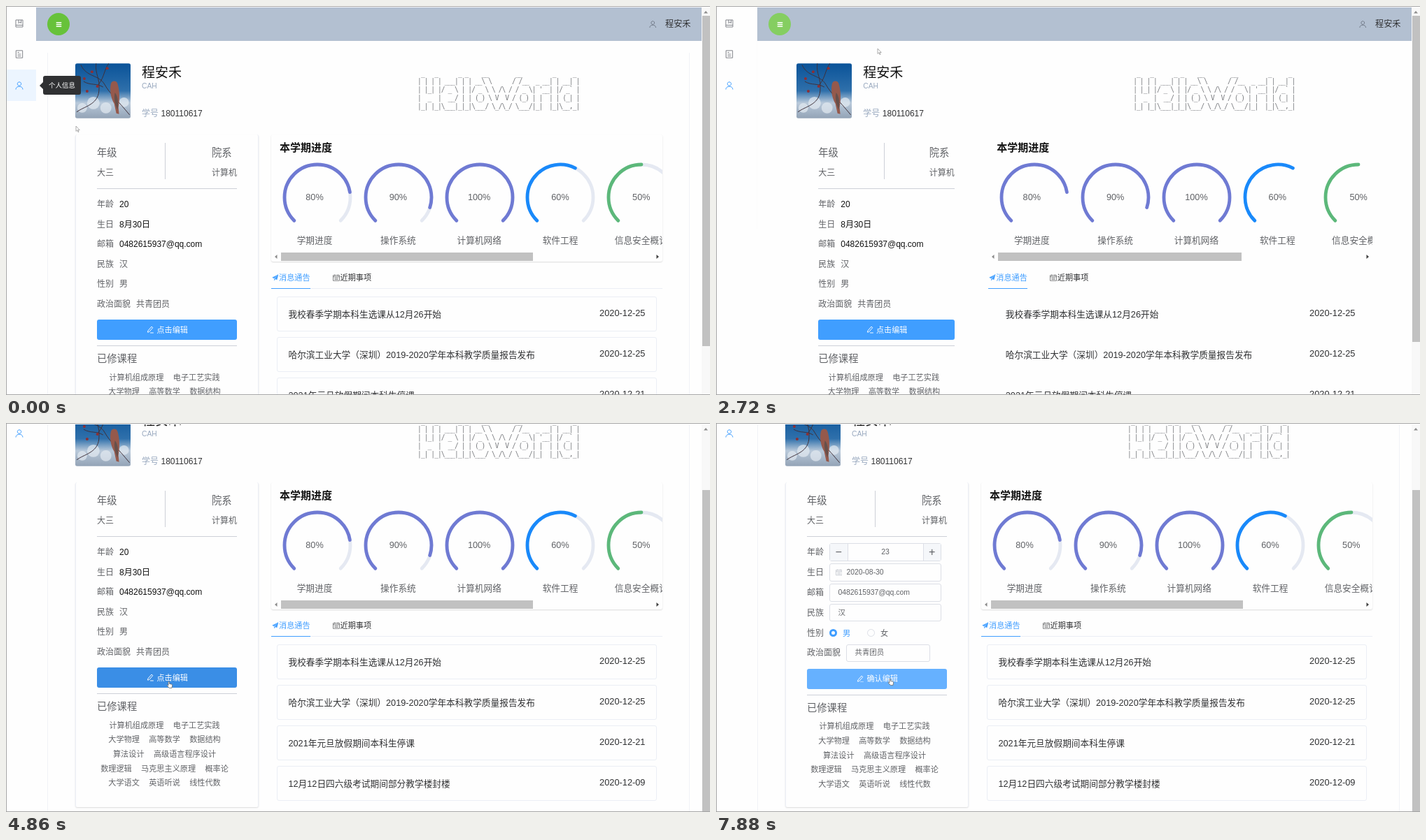
An HTML page that plays this animation: 1006x557 px, repeating every 8000 ms.

```html
<!DOCTYPE html>
<html lang="zh-CN">
<head>
<meta charset="utf-8">
<title>个人信息</title>
<style>
html, body { margin: 0; width: 100%; height: 100%; overflow: hidden; background: #fff; }
#stage { --k: 0; --edge: #ebeef5; --track: #e5e9f2; --shade: rgba(0,0,0,.14); --btn: #409eff;
  position: absolute; inset: 0; width: 1006px; height: 557px; overflow: hidden; background: #fefefe;
  font-family: "Liberation Sans", "Noto Sans CJK SC", "Noto Sans CJK", sans-serif; color: #303133; }
#stage.pale { --edge: transparent; --track: transparent; --shade: transparent; }
#stage div, #stage svg { position: absolute; box-sizing: border-box; }
#view { inset: 0; clip-path: inset(2px 12px 0 0); }
#page { inset: 0; }
.t { white-space: nowrap; line-height: 20px; }
.mid { width: 120px; text-align: center; }
.card { border-radius: 3px; box-shadow: 0 1px 2px var(--shade); }
.line { background: #cdd0d8; }
.item { left: 8px; right: 8px; height: 50px; border: 1px solid var(--edge); border-radius: 3px; }
.input { height: 25.5px; border: 1px solid #dcdfe6; border-radius: 3px; }
.step { top: 0; bottom: 0; width: 25.5px; background: #f5f7fa; text-align: center; line-height: 23px; color: #606266; }
#side { left: 0; top: 0; height: 320px; width: calc(43px + 109px * var(--k)); overflow: hidden; }
#sideEdge { left: calc(42px + 109px * var(--k)); top: 50px; width: 1px; height: 270px; background: #e6e6e6; opacity: var(--k); }
#head { left: calc(43px + 109px * var(--k)); right: 12px; top: 2px; height: 47.7px; background: #b3c0d1; }
#panel { left: calc(59px + 108.6px * var(--k)); right: 29px; top: 67px; height: 620px; border: solid var(--edge); border-width: 0 1px; opacity: .7; }
#who { left: calc(108.6px * var(--k)); top: 0; }
#art { left: calc(588.1px + 54px * var(--k)); top: 90.7px; margin: 0; position: absolute;
  font: 9.6px/11.75px "DejaVu Sans Mono", monospace; letter-spacing: -.1em; color: #77797d; }
#left { left: calc(99px + 108.4px * var(--k)); width: calc(262px - 37.4px * var(--k)); top: 0; height: 660px; }
#right { left: calc(379px + 68.6px * var(--k)); right: 68px; top: 0; height: 660px; }
#rings { left: 0; right: 0; top: 184px; height: 182px; overflow: hidden; }
#ringBox { left: 0; top: -184px; width: 900px; height: 366px; }
#courses { left: 27.5px; right: 34.5px; top: 521.7px; text-align: center; font-size: 11.15px; line-height: 20.65px; color: #606266; }
#courses span { display: inline-block; margin: 0 6.7px; }
.button { left: 31px; right: 31px; top: 449px; height: 29px; border-radius: 3px; background: var(--btn); }
.caption { left: 50%; margin-left: -14.5px; top: 4.5px; font-size: 11.1px; color: #fff; }
#window { inset: 0; border: solid #a6a6a6; border-width: 1px 0 1px 1px; }
</style>
</head>
<body>
<div id="stage"></div>
<script>
const GREY = '#606266', INK = '#303133', BLUE = '#409eff';
const icons = {
  book: 'M1 1h10v10H1zM5 1v4.6l1.8-1.4 1.8 1.4V1M1 8.4h10',
  doc: 'M1.3.8h9.4v10.4H1.3zM3.6 3.4h2.2M3.6 6h4.8M3.6 8.6h4.8',
  user: 'M6 .8a2.7 2.7 0 1 1-.01 0zM1 11.5c0-5.8 10-5.8 10 0',
  plane: 'M11.5.8L.8 6l3 1.5zM11.5.8L5 8l4 2zM4.3 8.3v3l1.6-1.9z',
  cal: 'M.6 2h10.8v9.2H.6zM.6 4.4h10.8M3.2.6v2.2M8.8.6v2.2M2.8 6.7h6.4M2.8 9h6.4',
  pen: 'M2.2 8L8 1.2l2 1.8-5.8 6.8-2.6.6zM5.8 11.4h5.4',
  menu: 'M1 2.4h10M1 6h10M1 9.6h10'
};

const box = (css, inner = '') => `<div style="${css}">${inner}</div>`;
const text = (x, y, size, str, color = INK, css = '', cls = '') =>
  `<div class="t ${cls}" style="left:${x}px;top:${y - 10}px;font-size:${size}px;color:${color};${css}">${str}</div>`;
const centered = (x, y, size, str, color) => text(x - 60, y, size, str, color, '', 'mid');
const icon = (name, cx, cy, size, color, weight = 1, fill = 'none') =>
  `<svg viewBox="0 0 12 12" style="left:${cx - size / 2}px;top:${cy - size / 2}px" width="${size}" height="${size}"
    fill="${fill}" stroke="${color}" stroke-width="${weight}"><path d="${icons[name]}"/></svg>`;
const arrow = (x, y, turn, color) =>
  `<svg style="left:${x - 3}px;top:${y - 3}px;transform:rotate(${turn}deg)" width="6" height="6"><path d="M0 4.5L3 1l3 3.5z" fill="${color}"/></svg>`;

const menu = [['book', '总体情况'], ['doc', '选课'], ['user', '个人信息']];
const menuY = i => 25 + i * 44.4;
const menuIcons = menu.map(([name], i) => icon(name, 18.5, menuY(i), 12, i == 2 ? BLUE : '#808389')).join('');
const menuLabels = menu.map(([, label], i) => text(32, menuY(i), 11.15, label, i == 2 ? BLUE : INK)).join('');

const photo = `<svg style="left:98.5px;top:82px;border-radius:3px" width="79.5" height="79" viewBox="0 0 80 79">
  <defs><linearGradient id="sky" x2="0" y2="1"><stop offset="0" stop-color="#0a5399"/><stop offset=".5" stop-color="#2f70ab"/>
  <stop offset=".72" stop-color="#b9c9da"/><stop offset="1" stop-color="#93a3b6"/></linearGradient></defs>
  <path d="M0 0h80v79H0z" fill="url(#sky)"/>
  <g fill="#e4ebf2" opacity=".7"><circle cx="26" cy="57" r="9"/><circle cx="44" cy="64" r="8"/><circle cx="10" cy="64" r="7"/><circle cx="70" cy="56" r="7"/></g>
  <path d="M8 2c8 18 26 14 34 28s18 22 36 44M30 0c-2 16 6 20 4 40S12 62 2 70M48 0c-8 12-6 22-18 34M12 26c10 6 18 2 28 8" fill="none" stroke="#40313a"/>
  <g fill="#8c2f35"><circle cx="13" cy="22" r="2"/><circle cx="24" cy="12" r="2"/><circle cx="32" cy="33" r="2"/><circle cx="46" cy="7" r="2"/><circle cx="17" cy="40" r="2"/></g>
  <path d="M51 30c1-6 9-6 10 0 3 10 3 22 1 34l1 9-4-1-3-14c-4-6-7-18-5-28z" fill="#95594c"/>
  <path d="M57 42c5 6 5 15 4 25-4-8-6-16-4-25z" fill="#66504b"/></svg>`;

const art = String.raw` _   _      _ _    __        __         _     _
| | | | ___| | | __\ \      / /__  _ __| | __| |
| |_| |/ _ \ | |/ _ \ \ /\ / / _ \| '__| |/ _${'`'} |
|  _  |  __/ | | (_) \ V  V / (_) | |  | | (_| |
|_| |_|\___|_|_|\___/ \_/\_/ \___/|_|  |_|\__,_|`;

const MAIL = '0482615937@qq.com', NAME = '程安禾';
const fields = [['年龄', '20'], ['生日', '8月30日'], ['邮箱', MAIL], ['民族', '汉'], ['性别', '男'], ['政治面貌', '共青团员']];
const readRows = fields.map(([label, value], i) => {
  const y = 284 + i * 28.6;
  return text(31, y, 12, label, GREY) + text(39 + label.length * 12, y, 12, value, i > 2 ? GREY : '#111');
}).join('');

const input = (y, str, x = 63, width = 160, pad = 11.5) =>
  `<div class="input" style="left:${x}px;top:${y - 12.8}px;width:${width}px">${text(pad, 11.8, 10.4, str, GREY)}</div>`;
const rowY = i => 284.2 + i * 28.85;
const radio = (x, on) => box(`left:${x}px;top:${rowY(4) - 5.6}px;width:11.2px;height:11.2px;border-radius:50%;` +
  (on ? `border:3.7px solid ${BLUE};background:#fff` : 'border:1px solid #dcdfe6'));
const editRows = fields.map(([label], i) => text(31, rowY(i), 12, label, GREY)).join('') +
  `<div id="age" class="input" style="left:63px;top:${rowY(0) - 12.8}px;width:160px">
    <div class="step" style="left:0;border-right:1px solid #dcdfe6">−</div>
    <div id="count" class="t mid" style="left:19px;top:2px;font-size:10.4px;color:${GREY}"></div>
    <div id="plus" class="step" style="right:0;border-left:1px solid #dcdfe6">+</div></div>` +
  input(rowY(1), '2020-08-30', 63, 160, 23.5) + icon('cal', 76.5, rowY(1), 9.5, '#c0c4cc') +
  input(rowY(2), MAIL) + input(rowY(3), '汉') +
  radio(63.2, true) + text(82, rowY(4), 11.2, '男', BLUE) + radio(117, false) + text(136, rowY(4), 11.2, '女', GREY) +
  input(rowY(5), '共青团员', 87, 119.5);

const courses = '计算机组成原理 电子工艺实践 大学物理 高等数学 数据结构 算法设计 高级语言程序设计 数理逻辑 马克思主义原理 概率论 大学语文 英语听说 线性代数'
  .split(' ').map(c => `<span>${c}</span>`).join('');

const leftCard = `<div class="card" style="inset:184px 0 auto;height:464.5px;border:solid var(--edge);border-width:0 1px"></div>` +
  text(31, 210, 14.3, '年级', GREY) + text(31, 239, 12, '大三', GREY) +
  `<div style="right:31px;top:0;width:36px">${text(0, 210, 14.3, '院系', GREY) + text(0, 239, 12, '计算机', GREY)}</div>
  <div class="line" style="left:calc(50% - 3.5px);top:196px;width:1px;height:52px"></div>
  <div class="line" style="left:31px;right:31px;top:261px;height:1px"></div>
  <div id="read">${readRows}</div><div id="edit">${editRows}</div>
  <div id="after" style="left:0;right:0;top:0">
    <div class="button">
      <div style="left:50%;top:0">${icon('pen', -23.5, 14.5, 10.5, '#fff', 1.1)}</div><div id="caption" class="t caption"></div>
    </div>
    <div class="line" style="left:31px;right:31px;top:486px;height:1px"></div>
    ${text(31, 505, 14.3, '已修课程', GREY)}<div id="courses">${courses}</div>
  </div>`;

const ring = (pct, label, color, i) => {
  const cx = 66 + i * 115.8, tx = i ? cx - .4 : cx - 4;
  const arc = (deg, stroke) => `<circle r="47" pathLength="360" stroke-dasharray="${deg} 360" style="stroke:${stroke}"/>`;
  return `<svg style="left:${cx - 50}px;top:224px" width="100" height="100" viewBox="-50 -50 100 100">
    <g transform="rotate(135)" fill="none" stroke-width="4.8" stroke-linecap="round">${arc(270, 'var(--track)') + arc(2.7 * pct, color)}</g></svg>` +
    centered(tx, 273.5, 12.7, pct + '%', GREY) + centered(tx, 336, 12.7, label, GREY);
};
const violet = '#6f7ad3';
const rings = [[80, '学期进度', violet], [90, '操作系统', violet], [100, '计算机网络', violet],
  [60, '软件工程', '#1989fa'], [50, '信息安全概论', '#5cb87a']].map((r, i) => ring(...r, i)).join('');

const news = [['我校春季学期本科生选课从12月26开始', 25], ['哈尔滨工业大学（深圳）2019-2020学年本科教学质量报告发布', 25],
  ['2021年元旦放假期间本科生停课', 21], ['12月12日四六级考试期间部分教学楼封楼', '09']].map(([title, day], i) =>
  `<div class="item" style="top:${416 + i * 58}px">${text(15.5, 24.8, 12.7, title)}
    ${text(0, 23, 12.8, '2020-12-' + day, INK, 'left:auto;right:15.5px')}</div>`).join('');

const rightCard = `<div class="card" style="inset:184px 0 auto;height:182px"></div>
  <div id="rings"><div id="ringBox">${rings}</div>
    <div style="left:14px;top:169px;width:calc(360px - 85px * var(--k));height:11.5px;background:#c1c1c1"></div>
    ${arrow(7, 174.5, -90, '#8c8c8c')}<div style="right:7px;top:0">${arrow(0, 174.5, 90, '#404040')}</div></div>` +
  text(12, 203, 15, '本学期进度', '#111', 'font-weight:700') +
  icon('plane', 5.5, 389, 9.5, BLUE, .5, BLUE) + text(11, 389, 11.15, '消息通告', BLUE) +
  icon('cal', 93, 389, 10, INK, .7) + text(98.5, 389, 11.15, '近期事项') +
  `<div style="left:0;right:0;top:403.5px;height:1.6px;background:var(--edge)"></div>
  <div style="left:0;width:56px;top:403.5px;height:1.6px;background:${BLUE}"></div>` + news;

const stage = document.getElementById('stage');
stage.innerHTML = `<div id="view"><div id="page">
  <div id="panel"></div><div id="head"></div>
  <div id="side"><div id="row" style="left:1px;right:0;top:91px;height:44.5px;background:#ecf5ff"></div>
    ${menuIcons}<div id="labels">${menuLabels}</div></div>
  <div id="sideEdge"></div>
  ${icon('user', 924.5, 26, 10.5, '#6b7380')}${text(942, 26, 12.2, NAME)}
  <div id="who">
    <div id="toggle" style="left:59px;top:10px;width:32px;height:32px;border-radius:50%">${icon('menu', 16, 16, 9, '#fff', 2)}</div>
    ${photo}${text(194, 95.5, 19, NAME, '#111')}${text(194, 115, 10.3, 'CAH', '#99a9bf')}
    ${text(194, 153.5, 12, '学号', '#99a9bf')}${text(221.5, 153.5, 12, '180110617')}
  </div>
  <pre id="art">${art}</pre>
  <div id="left">${leftCard}</div><div id="right">${rightCard}</div>
  <div id="tip" style="left:53px;top:100px;width:54px;height:27px;border-radius:3px;background:#303133">
    ${box('left:-5px;top:8.5px;border:5px solid transparent;border-left:0;border-right-color:#303133')}
    ${text(8, 13.5, 9.5, '个人信息', '#fff')}</div>
</div></div>
<div style="right:0;top:2px;width:12px;bottom:0;background:#f8f8f8">${arrow(6, 7, 0, '#8c8c8c')}
  <div id="thumb" style="left:1px;width:10.5px;background:#c1c1c1"></div></div>
<svg id="cursor" width="12" height="14" style="left:0;top:0" fill="#fff" stroke-linejoin="round">
  <path id="point" d="M1 1v7.4l1.8-1.6 1.3 2.9 1-.5-1.3-2.7h2.4z" stroke="#999" stroke-width=".8"/>
  <path id="hand" d="M3 7V1.6q.8-1 1.6 0V4.4l3.2.8q1 .4.8 1.5L8 10.4H4.3L1 6.8q.4-1 1.2-.4z" stroke="#666" stroke-width=".8"/></svg>
<div id="window"></div>`;

// Step tables: each row holds from its time until the next one.
const open = [[0, 0], [1230, .45], [1350, .9], [1470, 1], [2570, .6], [2700, .15], [2840, 0]];
const scroll = [[0, 0], [3480, 60], [3630, 99]];
const tip = [[0, 1], [270, .4], [400, 0]];
const press = [[0, BLUE], [4310, '#66b1ff'], [4720, '#3a8ee6'], [4980, '#66b1ff'], [6930, BLUE], [7760, '#66b1ff']];
const age = [[0, 20], [6930, 21], [7210, 22], [7340, 23]];
const cursor = [
  [0, 99, 171], [120, 150, 200], [270, 230, 226], [400, 250, 227], [530, 215, 180], [680, 150, 100], [810, 100, 45],
  [950, 76, 27, 1], [1090, 72, 24, 1], [1470, 139, 24, 1], [1620, 164, 25, 1], [1760, 176, 23, 1],
  [2700, 230, 60], [2840, 310, 125], [2970, 370, 172], [3110, 389, 185],
  [4040, 360, 230], [4180, 300, 310], [4310, 250, 355, 1], [4440, 229, 369, 1],
  [5380, 245, 368, 1], [5530, 259, 368, 1],
  [6110, 275, 335], [6250, 290, 275], [6380, 300, 222], [6510, 304, 192, 1], [6650, 306, 183, 1],
  [7620, 285, 265], [7760, 255, 352, 1], [7880, 245, 365, 1]
];
const at = (table, t) => table.findLast(row => row[0] <= t);
const value = (table, t) => at(table, t)[1];
const within = (t, from, to) => t >= from && t < to;
const $ = Object.fromEntries([...stage.querySelectorAll('[id]')].map(e => [e.id, e]));
const show = (e, on) => { e.style.display = on ? '' : 'none'; };

function render(t) {
  const k = value(open, t), y = value(scroll, t), editing = t >= 4980;
  const [, cx, cy, hand] = at(cursor, t);
  stage.style.setProperty('--k', k);
  stage.style.setProperty('--btn', value(press, t));
  stage.classList.toggle('pale', within(t, 2570, 3480));
  $.page.style.transform = `translateY(${-y}px)`;
  $.thumb.style.top = 12 + y * .83 + 'px';
  $.thumb.style.height = 473 - 40 * k + 'px';
  $.tip.style.opacity = value(tip, t);
  show($.row, t < 270);
  show($.labels, within(t, 1230, 2570));
  $.toggle.style.background = t < 950 ? '#67c23a' : '#85ce61';
  show($.read, !editing);
  show($.edit, editing);
  $.after.style.top = editing ? '1.6px' : 0;
  $.caption.textContent = editing ? '确认编辑' : '点击编辑';
  $.count.textContent = value(age, t);
  $.age.style.borderColor = within(t, 6380, 7620) ? BLUE : '#dcdfe6';
  $.plus.style.color = within(t, 6510, 7620) ? BLUE : GREY;
  $.cursor.style.transform = `translate(${cx}px,${cy}px)`;
  show($.hand, hand);
  show($.point, !hand);
}

function tick() {
  render(performance.now() % 8000);
  requestAnimationFrame(tick);
}
tick();
</script>
</body>
</html>
```
